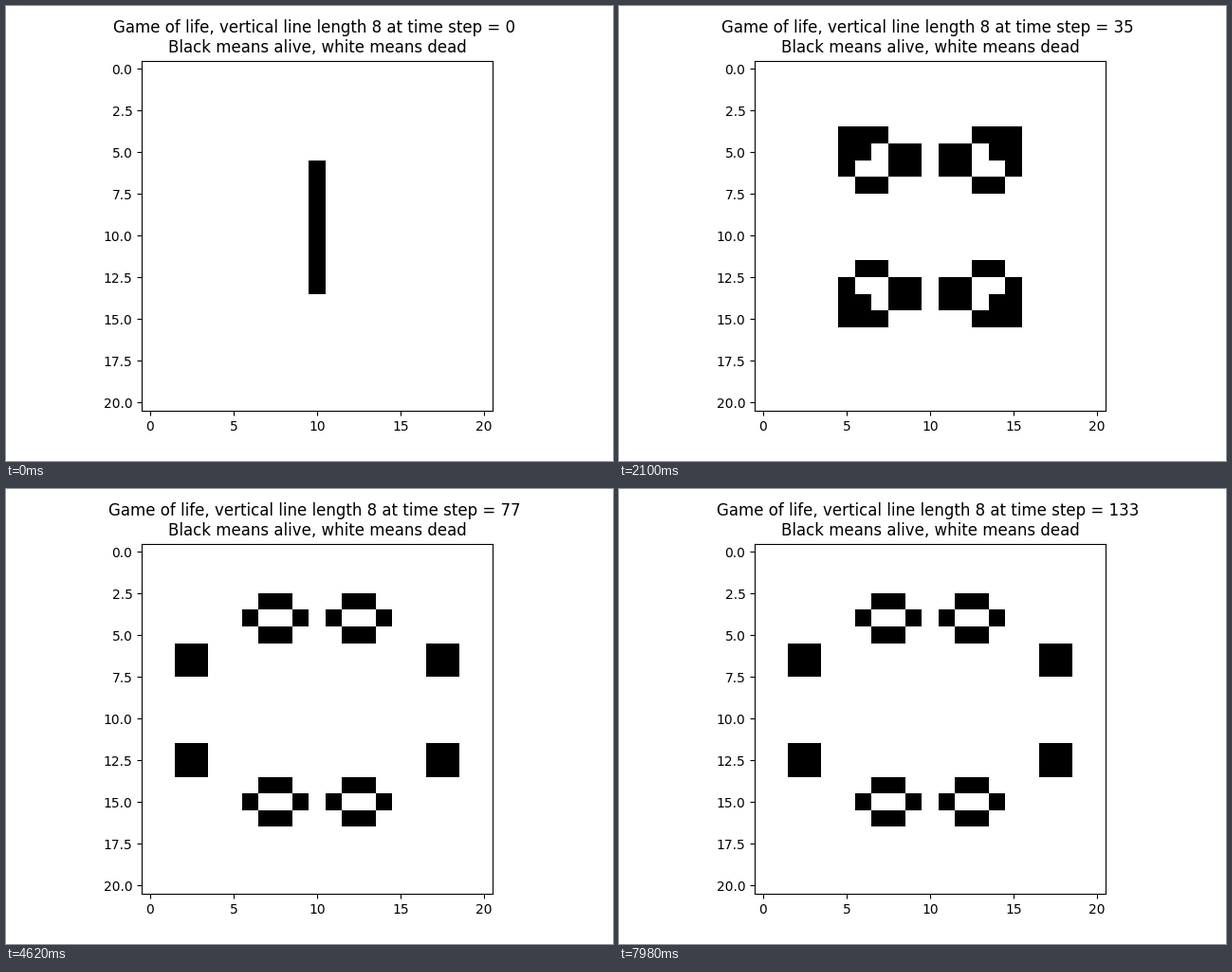
Recreate the animation shown at these times as a matplotlib script. Size 640 by 480 pixels, loop 8000 ms.

```python
import numpy as np
import matplotlib.pyplot as plt
from matplotlib.animation import FuncAnimation

SIZE = 21
LENGTH = 8
TICK = 20        # ms per drawn frame
HOLD = 3         # frames per generation
FRAMES = 400


def evolve(grid):
    padded = np.pad(grid, 1)
    around = sum(
        padded[r:r + SIZE, c:c + SIZE]
        for r in range(3) for c in range(3) if (r, c) != (1, 1)
    )
    return ((around == 3) | ((grid == 1) & (around == 2))).astype(int)


def run(steps):
    grid = np.zeros((SIZE, SIZE), dtype=int)
    top = SIZE // 2 - LENGTH // 2
    grid[top:top + LENGTH, SIZE // 2] = 1
    history = [grid]
    for _ in range(steps):
        history.append(evolve(history[-1]))
    return history


history = run((FRAMES - 1) // HOLD)

fig, ax = plt.subplots(figsize=(6.4, 4.8), dpi=100)
image = ax.imshow(history[0], cmap="binary", vmin=0, vmax=1,
                  interpolation="nearest")
title = ax.set_title("")


def update(frame):
    step = frame // HOLD
    image.set_data(history[step])
    title.set_text(
        f"Game of life, vertical line length {LENGTH} at time step = {step} \n"
        "Black means alive, white means dead"
    )
    return image, title


anim = FuncAnimation(fig, update, frames=FRAMES, interval=TICK,
                     init_func=lambda: update(0), repeat=True,
                     repeat_delay=0, blit=False)

plt.show()
```
